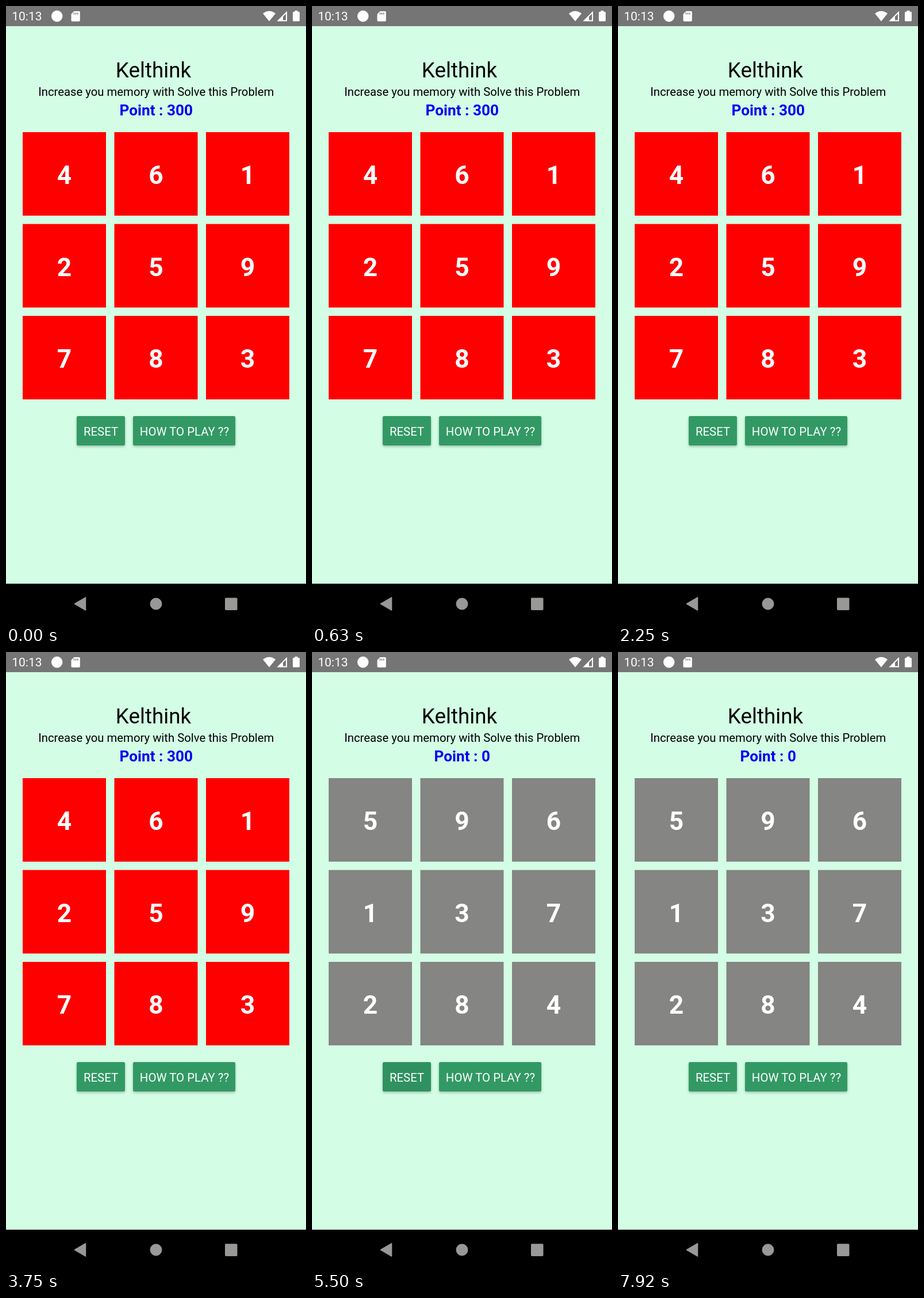
These frames come from a looping animation (522x1073 px, 8000 ms). An HTML page:

```html
<!DOCTYPE html>
<html lang="en">
<head>
<meta charset="utf-8">
<title>Number puzzle</title>
<style>
  html, body { margin: 0; width: 100%; height: 100%; overflow: hidden; background: #d3fde5; }
  svg { display: block; width: 522px; height: 1073px; font-family: Roboto, sans-serif; }
  text { text-anchor: middle; }
  .point { font: bold 26.2px Roboto, sans-serif; fill: #0000f4; }
  .digit { font: bold 44.4px Roboto, sans-serif; fill: #fff; }
  .button { fill: #329965; filter: drop-shadow(0 2px 2px rgba(0, 0, 0, .26)); }
  .label { font-size: 20.4px; fill: #fff; }
  #ripple { transform-origin: 155px 737px; opacity: 0; }
</style>
</head>
<body>
<svg viewBox="0 0 522 1073">
  <defs>
    <clipPath id="resetClip"><rect x="123" y="712" width="84" height="51" rx="2.5"/></clipPath>
  </defs>
  <rect width="522" height="1073" fill="#d3fde5"/>

  <!-- status bar -->
  <rect width="522" height="35" fill="#757575"/>
  <g fill="#fff">
    <text x="10.2" y="25" font-size="21" style="text-anchor:start">10:13</text>
    <circle cx="88.7" cy="17.6" r="9.8"/>
    <path d="M118.6 9H127q1.8 0 1.8 1.8V25q0 1.8-1.8 1.8H115.3q-1.8 0-1.8-1.8V14.1Z"/>
    <path d="M447 13Q458 4.500 469 13L458 26.500Z"/>
    <path d="M489 8.800V26.500H471.300ZM487 13.600L482 18.600V24.500H487Z" fill-rule="evenodd"/>
    <path d="M502.500 8h5v2h2q1.500 0 1.500 1.500v13.500q0 1.500-1.500 1.500h-9q-1.500 0-1.500-1.500v-13.500q0-1.500 1.500-1.500h2z"/>
  </g>
  <path d="M118.500 11.500v3.200M121.600 11.500v3.200M124.700 11.500v3.200" stroke="#757575" stroke-width="1.500"/>

  <!-- headings -->
  <text x="256.500" y="124" font-size="36.800">Kelthink</text>
  <text x="261.300" y="156" font-size="20.300">Increase you memory with Solve this Problem</text>

  <g id="boards"></g>

  <!-- buttons -->
  <rect class="button" x="123" y="712" width="84" height="51" rx="2.500"/>
  <rect class="button" x="221" y="712" width="178" height="51" rx="2.500"/>
  <g clip-path="url(#resetClip)"><circle id="ripple" cx="155" cy="737" r="62"/></g>
  <text class="label" x="165" y="745.500">RESET</text>
  <text class="label" x="310.500" y="745.500">HOW TO PLAY ??</text>

  <!-- navigation bar -->
  <rect y="1003" width="522" height="70"/>
  <g fill="#989896" stroke="#989896" stroke-linejoin="round">
    <path d="M119.500 1038L138.500 1027V1049Z" stroke-width="1.500"/>
    <circle cx="261" cy="1038" r="10"/>
    <rect x="381.500" y="1028" width="20.500" height="20.500" rx="1"/>
  </g>
</svg>
<script>
  const LOOP = 8000, PRESS = 5100, RESET = 5240;
  const NS = 'http://www.w3.org/2000/svg';

  function add(parent, tag, attrs, text) {
    const el = document.createElementNS(NS, tag);
    for (const key in attrs) el.setAttribute(key, attrs[key]);
    if (text !== undefined) el.textContent = text;
    return parent.appendChild(el);
  }

  function addBoard(digits, points, color) {
    const board = add(document.getElementById('boards'), 'g', {});
    add(board, 'text', { class: 'point', x: 261.3, y: 190 }, 'Point : ' + points);
    [...digits].forEach((digit, i) => {
      const x = 29 + (i % 3) * 159.5, y = 219 + Math.floor(i / 3) * 159.5;
      add(board, 'rect', { x, y, width: 145, height: 145, fill: color });
      add(board, 'text', { class: 'digit', x: x + 72.4, y: y + 90.3 }, digit);
    });
    return board;
  }

  // steps: [time in ms, style]
  function play(el, steps, easing) {
    const frames = steps.map(([time, style]) => ({ offset: time / LOOP, easing, ...style }));
    el.animate(frames, { duration: LOOP, iterations: Infinity });
  }

  const solved = addBoard('461259783', 300, '#fe0000');
  const fresh = addBoard('596137284', 0, '#858583');

  const swap = (el, from, to) => play(el, [
    [0, { opacity: from }], [RESET, { opacity: to }], [LOOP, { opacity: to }]
  ], 'step-end');
  swap(solved, 1, 0);
  swap(fresh, 0, 1);

  play(document.getElementById('ripple'), [
    [0, { opacity: 0, transform: 'scale(.2)' }],
    [PRESS, { opacity: 0, transform: 'scale(.2)' }],
    [PRESS + 80, { opacity: .11, transform: 'scale(.6)' }],
    [PRESS + 240, { opacity: .11, transform: 'scale(1)' }],
    [PRESS + 540, { opacity: 0, transform: 'scale(1)' }],
    [LOOP, { opacity: 0, transform: 'scale(1)' }]
  ], 'linear');
</script>
</body>
</html>
```
